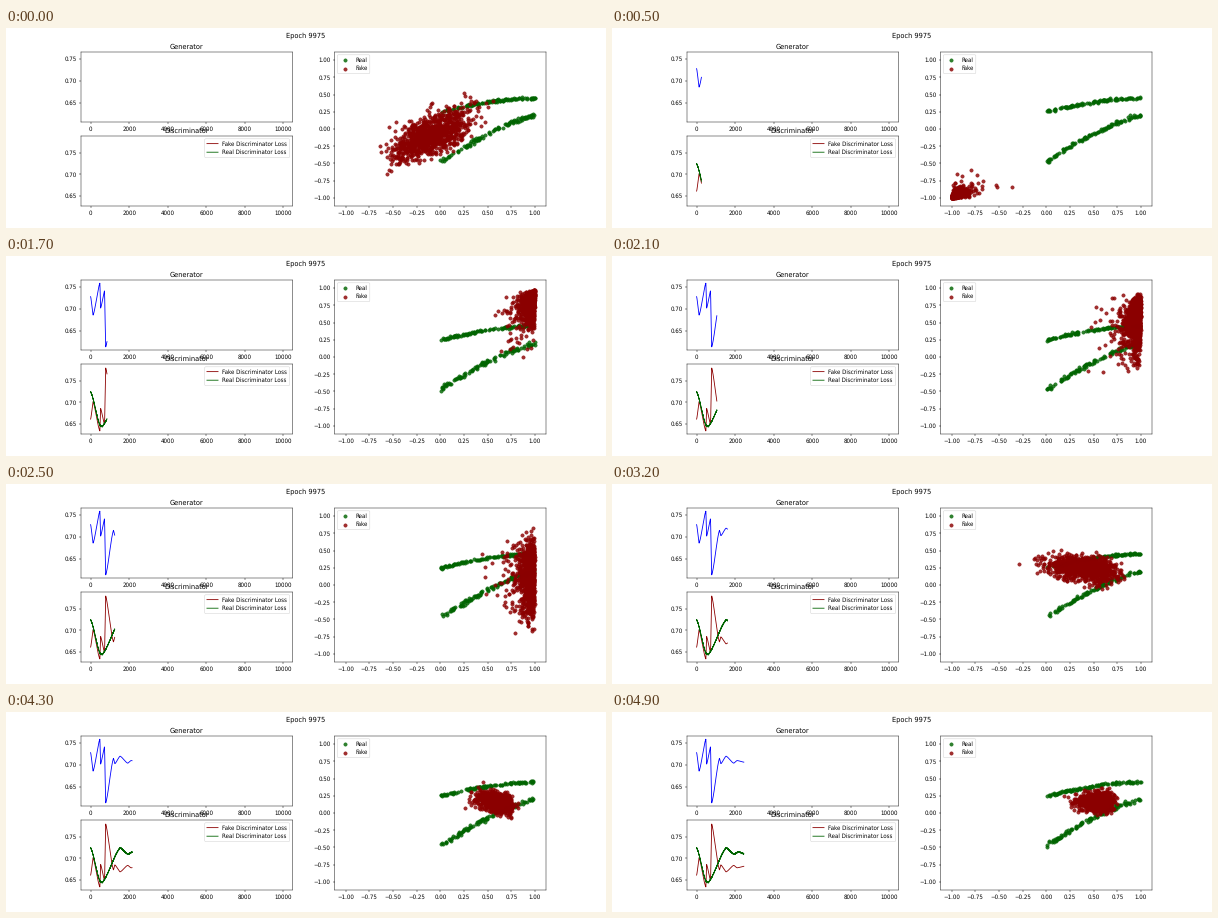
A matplotlib script that plays this animation: 600 by 200 pixels, repeating every 5000 ms.

```python
import matplotlib.pyplot as plt
import numpy as np
from matplotlib.animation import FuncAnimation

FRAMES, INTERVAL, STEP = 50, 100, 50
EPOCHS = np.arange(FRAMES * STEP)
N_REAL, N_FAKE = 100, 1000

# (epoch, loss) turning points
GENERATOR_TURNS = [(0, .727), (130, .685), (480, .7576), (520, .701),
                   (720, .740), (785, .6129), (1185, .714), (1260, .702),
                   (1530, .719), (1925, .703), (2100, .709), (2500, .705)]
REAL_TURNS = [(0, .725), (500, .645), (600, .643), (1540, .7245),
              (1940, .7095), (2180, .715), (2500, .710)]

# (frame, x, y) waypoints of the fake cloud before tanh squashing
CLOUD_PATH = [(0, -.12, -.10), (5, -2, -2), (9, -2.2, -2.2), (11, 1.9, -1.8),
              (15, 2, 1.5), (17, 1.95, 1.1), (25, 1.8, .13),
              (32, .42, .26), (38, .76, .16), (49, .61, .17)]

# Fine strokes and glyphs stay soft instead of snapping to whole pixels.
plt.rcParams["path.snap"] = False
plt.rcParams["text.hinting"] = "none"


def eased_curve(turns):
    """Join turning points with a half linear, half smoothstep ease."""
    x, y = np.array(turns).T
    i = np.searchsorted(x, EPOCHS, "right") - 1
    t = (EPOCHS - x[i]) / (x[i + 1] - x[i])
    eased = (t + t * t * (3 - 2 * t)) / 2
    return y[i] + (y[i + 1] - y[i]) * eased


def real_points(rng):
    upper, lower = rng.uniform(0, 1, (2, N_REAL))
    y_upper = .25 + .2 * np.sin(np.pi / 2 * upper) + rng.normal(0, .008, N_REAL)
    y_lower = -.47 + .67 * np.sin(1.2 * lower) / np.sin(1.2)
    y_lower += rng.normal(0, .016, N_REAL)
    return np.column_stack([np.append(upper, lower), np.append(y_upper, y_lower)])


def fake_points(rng, frame):
    """A tilted normal cloud that grows, travels and then contracts."""
    frames, xs, ys = zip(*CLOUD_PATH)
    grow = min(1, .48 + .104 * frame)
    settle = np.exp(-max(frame - 25, 0) / 6)
    spread_x = grow * (.12 + .33 * settle)
    spread_y = grow * (.07 + .24 * settle ** 2)
    tilt = grow * np.interp(frame, (5, 17, 25, 37, 49), (.25, .15, 0, -.05, 0))
    u, v = rng.normal(size=(2, N_FAKE))
    x = np.interp(frame, frames, xs) + spread_x * u
    y = np.interp(frame, frames, ys) + tilt * u + spread_y * v
    return np.tanh(np.column_stack([x, y]))


def loss_axes(position, title, ylim):
    ax = fig.add_subplot(position)
    ax.set_title(title)
    ax.set(xlim=(-498.75, 10473.75), ylim=ylim,
           xticks=range(0, 10001, 2000), yticks=[.65, .70, .75])
    return ax


fig = plt.figure(figsize=(15, 5), dpi=40)
fig.suptitle("Epoch 9975")

ax_gen = loss_axes(221, "Generator", (.6057, .7648))
ax_disc = loss_axes(223, "Discriminator", (.6254, .7899))
ax_data = fig.add_subplot(122)
quarters = np.arange(-4, 5) / 4
ax_data.set(xlim=(-1.116, 1.116), ylim=(-1.116, 1.116),
            xticks=quarters, yticks=quarters)

gen_line, = ax_gen.plot([], [], color="blue")
fake_line, = ax_disc.plot([], [], color="darkred", label="Fake Discriminator Loss")
real_line, = ax_disc.plot([], [], color="darkgreen", label="Real Discriminator Loss")
ax_disc.legend(loc="upper right")

real_dots = ax_data.scatter([], [], color="darkgreen", alpha=.8, label="Real")
fake_dots = ax_data.scatter([], [], color="darkred", alpha=.8, label="Fake")
ax_data.legend(loc="upper left")

gen_loss = eased_curve(GENERATOR_TURNS)
fake_loss = -np.log(1 - np.exp(-gen_loss))  # cross-entropy of the opposite label
jitter = np.random.default_rng(7).normal(0, .0005, len(EPOCHS))
real_loss = eased_curve(REAL_TURNS) + jitter


def update(frame):
    shown = frame * STEP + 1
    for line, loss in ((gen_line, gen_loss), (fake_line, fake_loss),
                       (real_line, real_loss)):
        line.set_data(EPOCHS[:shown], loss[:shown])
    rng = np.random.default_rng(100 + frame)
    real_dots.set_offsets(real_points(rng))
    fake_dots.set_offsets(fake_points(rng, frame))
    return gen_line, fake_line, real_line, real_dots, fake_dots


anim = FuncAnimation(fig, update, frames=FRAMES, interval=INTERVAL,
                     repeat=True, repeat_delay=0, blit=False)
plt.show()
```
